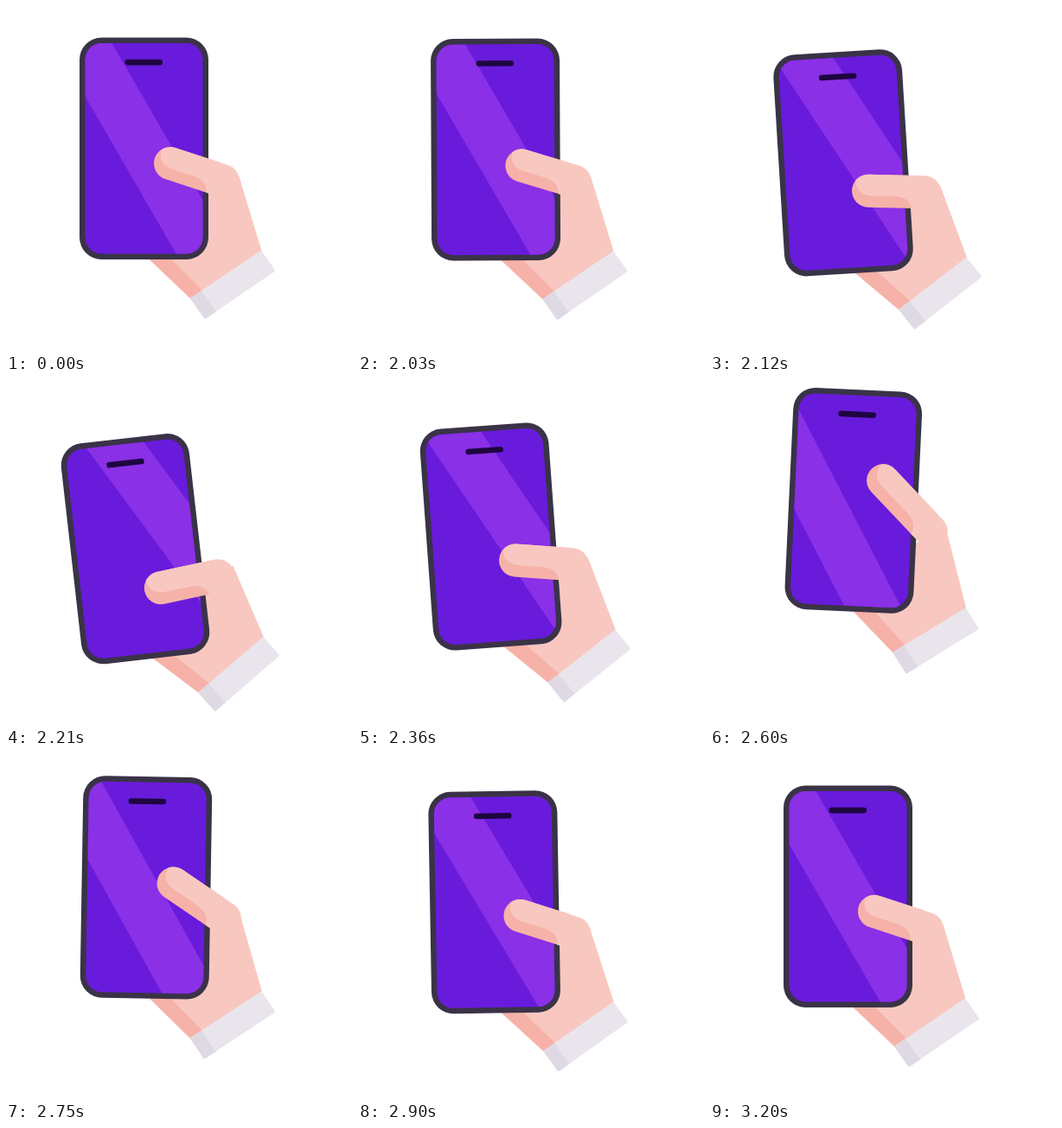
An HTML page that plays this animation: 400 by 400 pixels, repeating every 3.23 s.

```html
<!DOCTYPE html>
<html lang="en">
<head>
<meta charset="utf-8">
<title>Hand shaking a phone</title>
<style>
  html, body { margin: 0; width: 100%; height: 100%; overflow: hidden; background: #fff; }
  svg { display: block; width: 100%; height: 100%; }
</style>
</head>
<body>
<svg viewBox="0 0 400 400">
  <clipPath id="screen"><rect x="91.5" y="43" width="136" height="243.5" rx="19"/></clipPath>
  <g id="scene">
    <path fill="#f6b2a8" d="M156 284 L213 338 L228 328 L190 284Z"/>
    <path fill="#f8c8c0" d="M182 284 L227 329 L295.5 283 L269.5 197 L251 202 L225 215Z"/>
    <path fill="#eae5ed" d="M213 338 L295 282.5 L310.5 304.5 Q311.5 306 310 307.2 L231.5 361 Q230 362 229 360.8Z"/>
    <path fill="#ded9e3" d="M213 338 L226 329.2 L243 353.2 L231.5 361 Q230 362 229 360.8Z"/>
    <rect x="85" y="36.5" width="149" height="256.5" rx="25.5" fill="#3a3347"/>
    <g clip-path="url(#screen)">
      <path fill="#691bdc" d="M90 42H230V288H90Z"/>
      <path id="shine" fill="#8a30e6" d="M56 43H122.5L263.5 287H197Z"/>
    </g>
    <rect x="137.5" y="61.8" width="43.5" height="6.6" rx="2.8" fill="#1e0640"/>
    <g id="thumb">
      <path id="thumbShade" fill="#f6b2a8"/>
      <path id="thumbLight" fill="#f8c8c0"/>
    </g>
  </g>
</svg>
<script>
const LOOP = 3230, START = 2030, STEP = 30;
const REST = { at: 2000, drop: 0, lean: 0, bend: 0 };

// A damped shake: down, up, a small dip, then rest
const SWINGS = [
  REST,
  { at: 2230, drop: 31, lean: -6.6, bend: 31.5 },
  { at: 2610, drop: -25.5, lean: 2.7, bend: -42 },
  { at: 2900, drop: 6.5, lean: -1, bend: -1 },
  { ...REST, at: 3200 }
];

const set = (id, name, value) => document.getElementById(id).setAttribute(name, value);

function poseAt(time) {
  const next = SWINGS.findIndex(swing => swing.at > time);
  if (next < 1) return REST;
  const from = SWINGS[next - 1], to = SWINGS[next];
  const u = (time - from.at) / (to.at - from.at);
  const eased = (1 - Math.cos(Math.PI * u)) / 2;
  const mix = name => from[name] + (to[name] - from[name]) * eased;
  return { drop: mix('drop'), lean: mix('lean'), bend: mix('bend') };
}

// A round-ended bar from the tip to the knuckle, shaded along its lower side
function drawThumb(lean, bend) {
  const x = 190 + lean, y = 182 + bend;
  const dx = 251 - x, dy = 202 + 0.14 * bend - y;
  const len = Math.hypot(dx, dy), angle = Math.atan2(dy, dx) * 180 / Math.PI;
  set('thumb', 'transform', `translate(${x} ${y}) rotate(${angle})`);
  set('thumbShade', 'd', `M${len - 10} 19 H0 A19 19 0 0 1 0 -19 H${len - 10}Z`);
  set('thumbLight', 'd',
    `M-15 -11.7 C-14 0 -7 5.5 4 5.5 H${len - 34} Q${len - 18} 5.5 ${len - 14} 19 H${len}
     A19 19 0 0 0 ${len} -19 H0 A19 19 0 0 0 -15 -11.7Z`);
}

function render(now) {
  const t = now % LOOP;
  const time = t < START ? 0 : t - (t - START) % STEP;
  const { drop, lean, bend } = poseAt(time);
  const sway = 0.75 * lean - 0.17 * drop;
  set('scene', 'transform', `translate(${sway} ${drop}) rotate(${lean} 159.5 164.5)`);
  set('shine', 'transform', `translate(${1.35 * drop - 3 * lean} 0)`);
  drawThumb(lean, bend);
}

const begin = performance.now();
function tick() {
  render(performance.now() - begin);
  requestAnimationFrame(tick);
}
tick();
</script>
</body>
</html>
```
